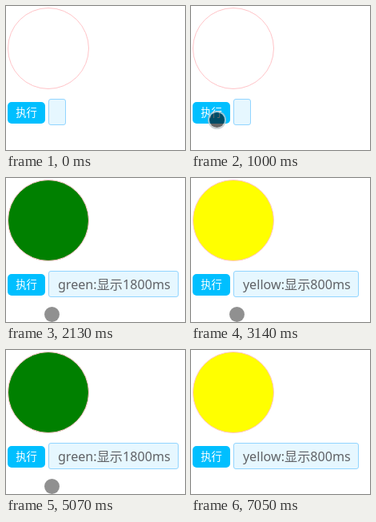
Write an HTML page that moves like this. It is 224 px wide and 180 px high and loops after 7430 ms.

```html
<!DOCTYPE html>
<html lang="zh">
<head>
<meta charset="utf-8">
<title>Traffic light</title>
<style>
  html, body {
    margin: 0;
    width: 100%;
    height: 100%;
    overflow: hidden;
    background: #fff;
  }

  .stage {
    --loop: 7430ms;
    position: relative;
    width: 224px;
    height: 180px;
    overflow: hidden;
  }

  .stage > * {
    position: absolute;
    box-sizing: border-box;
  }

  .lamp {
    left: 2px;
    top: 2px;
    width: 102px;
    height: 102px;
    border: 1px solid #ffc4c8;
    border-radius: 50%;
    animation: lamp var(--loop) step-end infinite;
  }

  .run {
    left: 2px;
    top: 120px;
    width: 47px;
    height: 27px;
    border-radius: 5px;
    background: #00bfff;
    color: #fff;
    font: 500 13.33px/25px "Noto Sans CJK SC", "Noto Sans CJK", sans-serif;
    text-align: center;
  }

  .tag {
    left: 53px;
    top: 116px;
    height: 33px;
    padding: 1px 9.3px 0 10.9px;
    border: 1px solid #91d5ff;
    border-radius: 3px;
    background: #e6f7ff;
    color: #606266;
    font: 16.15px/31px "Noto Sans", "Noto Sans CJK SC", "Noto Sans CJK", sans-serif;
    white-space: nowrap;
    animation: var(--show) var(--loop) step-end infinite;
  }

  .idle { --show: idle; }
  .green { --show: green; }
  .yellow { --show: yellow; }
  .red { --show: red; }

  .pointer {
    left: -9.5px;
    top: -9.5px;
    width: 19px;
    height: 19px;
    border-radius: 50%;
    background: rgba(0, 0, 0, .435);
    animation: move var(--loop) linear infinite, press var(--loop) step-end infinite;
  }

  @keyframes lamp {
    0% { background-color: #fff; }
    18.708% { background-color: green; }
    42.261% { background-color: yellow; }
    52.759% { background-color: red; }
    68.237% { background-color: green; }
    92.463%, 100% { background-color: yellow; }
  }

  @keyframes idle {
    0% { visibility: visible; }
    18.708%, 100% { visibility: hidden; }
  }

  @keyframes green {
    0%, 42.261%, 92.463%, 100% { visibility: hidden; }
    18.708%, 68.237% { visibility: visible; }
  }

  @keyframes yellow {
    0%, 52.759% { visibility: hidden; }
    42.261%, 92.463%, 100% { visibility: visible; }
  }

  @keyframes red {
    0%, 68.237%, 100% { visibility: hidden; }
    52.759% { visibility: visible; }
  }

  @keyframes move {
    0%, 1.614% { transform: translate(172px, 200px); }
    1.615% {
      transform: translate(170px, 183px);
      animation-timing-function: cubic-bezier(.3, .3, .4, 1);
    }
    11.575%, 12.65% { transform: translate(31px, 147.5px); }
    12.651% { transform: translate(32px, 144px); }
    13.459% { transform: translate(32px, 142px); }
    18.708% {
      transform: translate(32px, 142px);
      animation-timing-function: cubic-bezier(.4, 0, .4, 1);
    }
    28.668%, 86.002% { transform: translate(57px, 170px); }
    86.003% {
      transform: translate(62px, 171px);
      animation-timing-function: ease-in;
    }
    92.463%, 100% { transform: translate(125px, 200px); }
  }

  @keyframes press {
    0%, 18.708%, 100% {
      background-color: rgba(0, 0, 0, .435);
      box-shadow: none;
    }
    12.651% {
      background-color: rgba(0, 0, 0, .6);
      box-shadow: 0 0 0 2px rgba(190, 200, 204, .8);
    }
  }
</style>
</head>
<body>
<div class="stage">
  <div class="lamp"></div>
  <div class="run">执行</div>
  <div class="tag idle"></div>
  <div class="tag green">green:显示1800ms</div>
  <div class="tag yellow">yellow:显示800ms</div>
  <div class="tag red">red:显示1200ms</div>
  <div class="pointer"></div>
</div>
</body>
</html>
```
